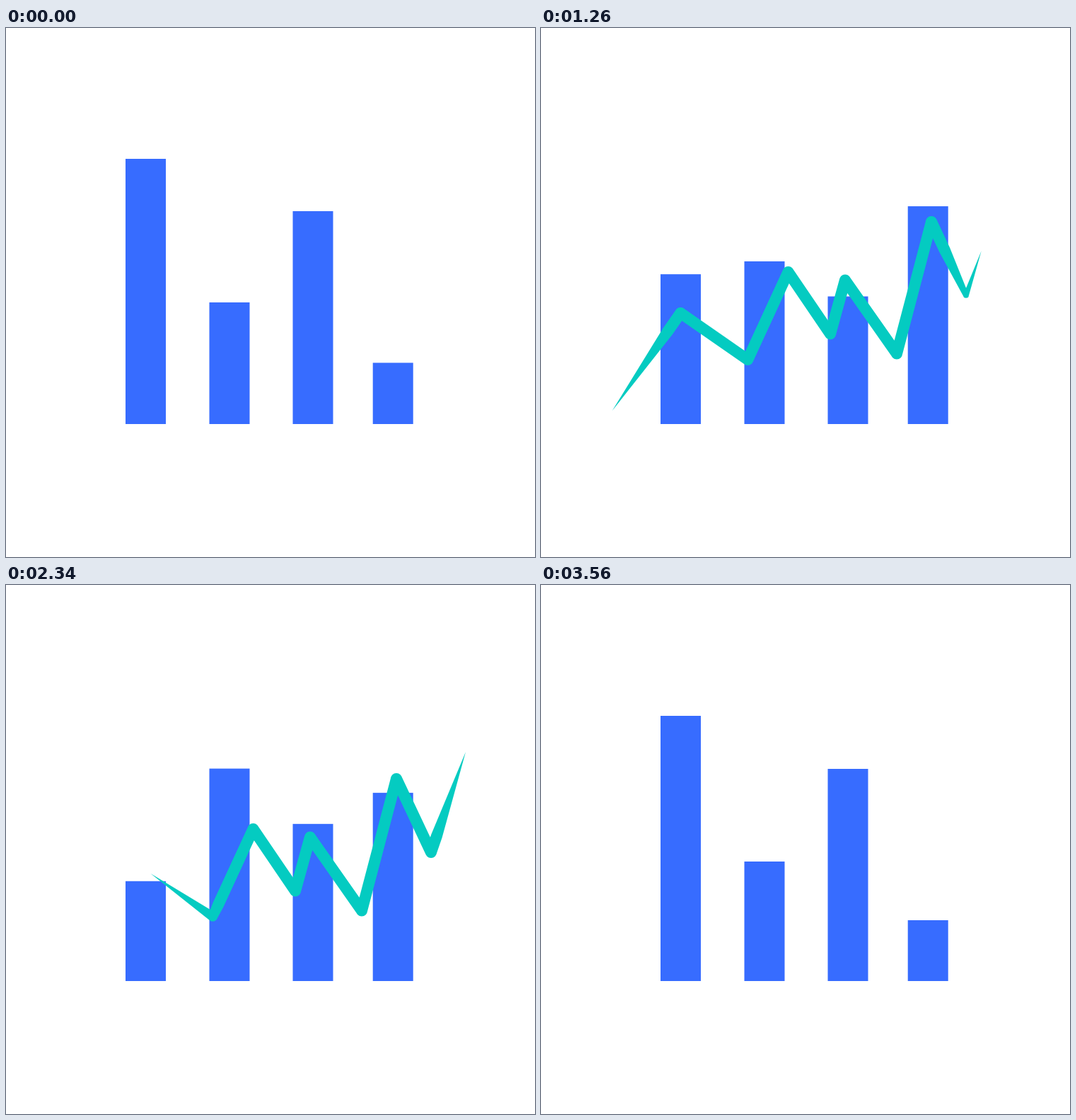
An HTML page with a canvas that plays this animation: 748x748 px, repeating every 3.94 s.

```html
<!DOCTYPE html>
<html lang="en">
<head>
<meta charset="utf-8">
<title>Bars and trend line</title>
<style>
  html, body { margin: 0; height: 100%; overflow: hidden; background: #fff; }
  canvas { display: block; width: 748px; height: 748px; }
</style>
</head>
<body>
<canvas id="stage" width="748" height="748"></canvas>
<script>
const ctx = document.getElementById('stage').getContext('2d');
const LOOP = 3940, MOVE = 3560, STEP = MOVE / 4, HALF = MOVE / 2;
const BASE = 560, BAR_W = 57, LINE_W = 16, TAPER = 0.124;

// Each bar: left edge, then its top at every key time
const bars = [
  [169, 185, 391, 260, 474, 185],
  [287.5, 388, 260, 474, 185, 391],
  [405.5, 259, 474, 185, 391, 260],
  [518.7, 473.4, 184.6, 391, 260, 474]
];

const points = [
  [100.5, 541.5], [197.3, 403], [292.3, 469], [349.5, 345], [409, 432.5],
  [430, 356.5], [503, 460.5], [552, 274], [601, 378], [650, 236]
];

// Cubic easing whose handles are level: (x1, 0) and (x2, 1)
function ease(x1, x2) {
  return u => {
    if (u <= 0) return 0;
    if (u >= 1) return 1;
    let lo = 0, hi = 1, s = 0.5;
    for (let i = 0; i < 30; i++) {
      s = (lo + hi) / 2;
      const r = 1 - s;
      if (3 * r * r * s * x1 + 3 * r * s * s * x2 + s * s * s < u) lo = s;
      else hi = s;
    }
    return s * s * (3 - 2 * s);
  };
}

const barEase = [ease(0.5, 0.5), ease(0.54, 0.46), ease(0.5, 0.5), ease(0.24, 0.4)];
const headEase = ease(0.685, 0.22);
const tailEase = ease(0.59, 0.4);

// Distance along the line at each point
const dist = [0];
for (let i = 1; i < points.length; i++) {
  const [x0, y0] = points[i - 1], [x1, y1] = points[i];
  dist.push(dist[i - 1] + Math.hypot(x1 - x0, y1 - y0));
}
const total = dist[dist.length - 1];

function drawBars(t) {
  const k = Math.min(3, Math.floor(t / STEP));
  const p = barEase[k](t / STEP - k);
  ctx.fillStyle = '#376cff';
  for (const [x, ...tops] of bars) {
    const top = tops[k] + (tops[k + 1] - tops[k]) * p;
    ctx.fillRect(x, top, BAR_W, BASE - top);
  }
}

function drawLine(from, to) {
  const len = to - from;
  if (len < 0.001) return;
  const taper = len * TAPER;
  const radius = d => LINE_W / 2 * Math.max(0, Math.min(1, (d - from) / taper, (to - d) / taper));

  ctx.fillStyle = '#04cbc1';
  ctx.beginPath();
  for (let i = 1; i < points.length; i++) {
    const start = dist[i - 1], end = dist[i];
    if (end <= from || start >= to) continue;
    const [x0, y0] = points[i - 1], [x1, y1] = points[i];
    const dx = (x1 - x0) / (end - start), dy = (y1 - y0) / (end - start);
    const edge = (d, side) => {
      const r = radius(d) * side, along = d - start;
      ctx.lineTo(x0 + dx * along - dy * r, y0 + dy * along + dx * r);
    };
    const lo = Math.max(start, from), hi = Math.min(end, to);
    const cuts = [lo, from + taper, to - taper, hi]
      .filter(d => d >= lo && d <= hi);

    for (let c = 1; c < cuts.length; c++) {
      const a = cuts[c - 1], b = cuts[c];
      const r = radius(a);
      ctx.moveTo(x0 + dx * (a - start) - dy * r, y0 + dy * (a - start) + dx * r);
      edge(b, 1);
      edge(b, -1);
      edge(a, -1);
      ctx.closePath();
    }
    // Round join
    if (end < to) {
      const r = radius(end);
      ctx.moveTo(x1 + r, y1);
      ctx.arc(x1, y1, r, 0, Math.PI * 2, true);
    }
  }
  ctx.fill();
}

function frame(now) {
  const t = Math.min(now % LOOP, MOVE);
  ctx.fillStyle = '#fff';
  ctx.fillRect(0, 0, 748, 748);
  drawBars(t);
  drawLine(total * tailEase((t - HALF) / HALF), total * headEase(t / HALF));
  requestAnimationFrame(frame);
}
requestAnimationFrame(frame);
</script>
</body>
</html>
```
